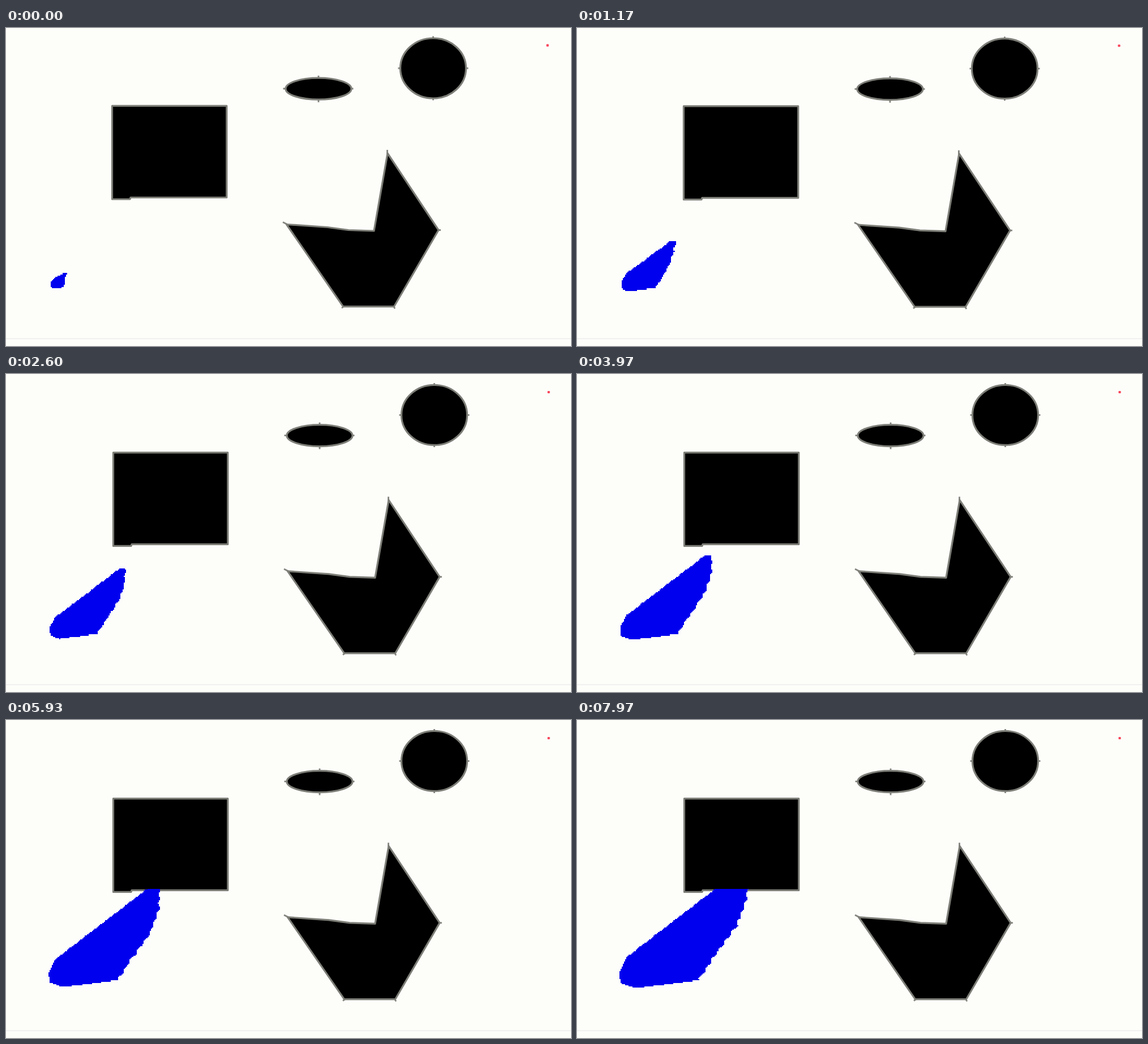
Recreate the animation shown at these times as an HTML page with a canvas. Size 998x561 px, loop 8 s.

```html
<!DOCTYPE html>
<html lang="en">
<head>
<meta charset="utf-8">
<title>Growing region among obstacles</title>
<style>
  html, body { margin: 0; width: 100%; height: 100%; overflow: hidden; background: #fdfdfa; }
  svg, canvas { position: absolute; left: 0; top: 0; width: 998px; height: 561px; display: block; }
  .soft { filter: blur(0.6px); }
  .obstacles { fill: #000; stroke: #7e7e78; stroke-width: 3.2; stroke-linejoin: round; }
  .spikes { fill: none; stroke: #85857f; stroke-width: 2.8; }
</style>
</head>
<body>
<svg viewBox="0 0 998 561">
  <path d="M0 548H998" stroke="#eeeeec" stroke-width="1.4"/>
  <g id="scene">
    <g class="soft">
      <path class="spikes" d="M754.5 14.500v5M754.5 122.500v5M692.500 71h5M811.500 71h5M552 84v5M552 126v5M489.500 107h5M608.500 107h5M673.500 215v8M489 342.500l8 4M762 356.500h6M593 494l4-3M684 490l3 5"/>
      <g class="obstacles">
        <path d="M187.500 137.300H389.800V299H220L219 302H187.500Z"/>
        <ellipse cx="552" cy="107.200" rx="58" ry="19"/>
        <ellipse cx="754.500" cy="71" rx="58" ry="53"/>
        <path d="M674 221L764 356.500L685.500 491.300H595.500L495.500 346.500L568 351.500L605 356.500L650 358Z"/>
      </g>
    </g>
    <rect x="954.500" y="28.500" width="4.200" height="4.200" rx="1" fill="#f8465a"/>
  </g>
</svg>
<canvas id="growth" width="998" height="561"></canvas>
<script>
const LOOP = 8000;
const CELL = 998 / 480;
const WALL_BOTTOM = 297.5;   // the rectangle hides everything above this line

// Corners of the region, clockwise from the left: start and end of each one's path
const corners = [
  { from: [80, 448], to: [74, 446] },
  { from: [88, 440], to: [88, 418] },
  { from: [102, 433], to: [287, 265] },
  { from: [108, 433], to: [301, 265] },
  { from: [104, 437], to: [301, 314] },
  { from: [103, 443], to: [282, 364] },
  { from: [104, 450], to: [240, 421] },
  { from: [100, 458], to: [215, 459] },
  { from: [84, 460], to: [104, 473] },
  { from: [80, 458], to: [77, 464] }
];

const ctx = document.getElementById('growth').getContext('2d');
const scene = document.getElementById('scene');

// The front slows down as the region spreads
const spread = time => (time / LOOP) ** 0.56;

const outlineAt = k => corners.map(({ from, to }) =>
  from.map((start, axis) => start + (to[axis] - start) * k));

// Where the outline crosses one row, from left to right
function crossings(points, y) {
  const xs = [];
  points.forEach(([x1, y1], i) => {
    const [x2, y2] = points[(i + 1) % points.length];
    if ((y1 <= y) !== (y2 <= y)) xs.push(x1 + (x2 - x1) * (y - y1) / (y2 - y1));
  });
  return xs.sort((a, b) => a - b);
}

function drawGrowth(k) {
  const points = outlineAt(k);
  const snap = x => Math.round(Math.round(x / CELL) * CELL);
  ctx.clearRect(0, 0, 998, 561);
  ctx.fillStyle = '#0000ee';
  for (let row = Math.floor(WALL_BOTTOM / CELL); row * CELL < 480; row++) {
    const top = Math.round(Math.max(row * CELL, WALL_BOTTOM));
    const bottom = Math.round((row + 1) * CELL);
    const ragged = Math.sin(row * 0.8) * CELL * k;
    const xs = crossings(points, (row + 0.5) * CELL);
    for (let i = 0; i + 1 < xs.length; i += 2) {
      const left = snap(xs[i]);
      ctx.fillRect(left, top, snap(xs[i + 1] + ragged) - left, bottom - top);
    }
  }
}

function frame(now) {
  const time = now % LOOP;
  const drift = Math.min(time / 2500, 1);
  scene.setAttribute('transform', `translate(${2 * drift} ${1.4 * drift})`);
  drawGrowth(spread(time));
  requestAnimationFrame(frame);
}
requestAnimationFrame(frame);
</script>
</body>
</html>
```
